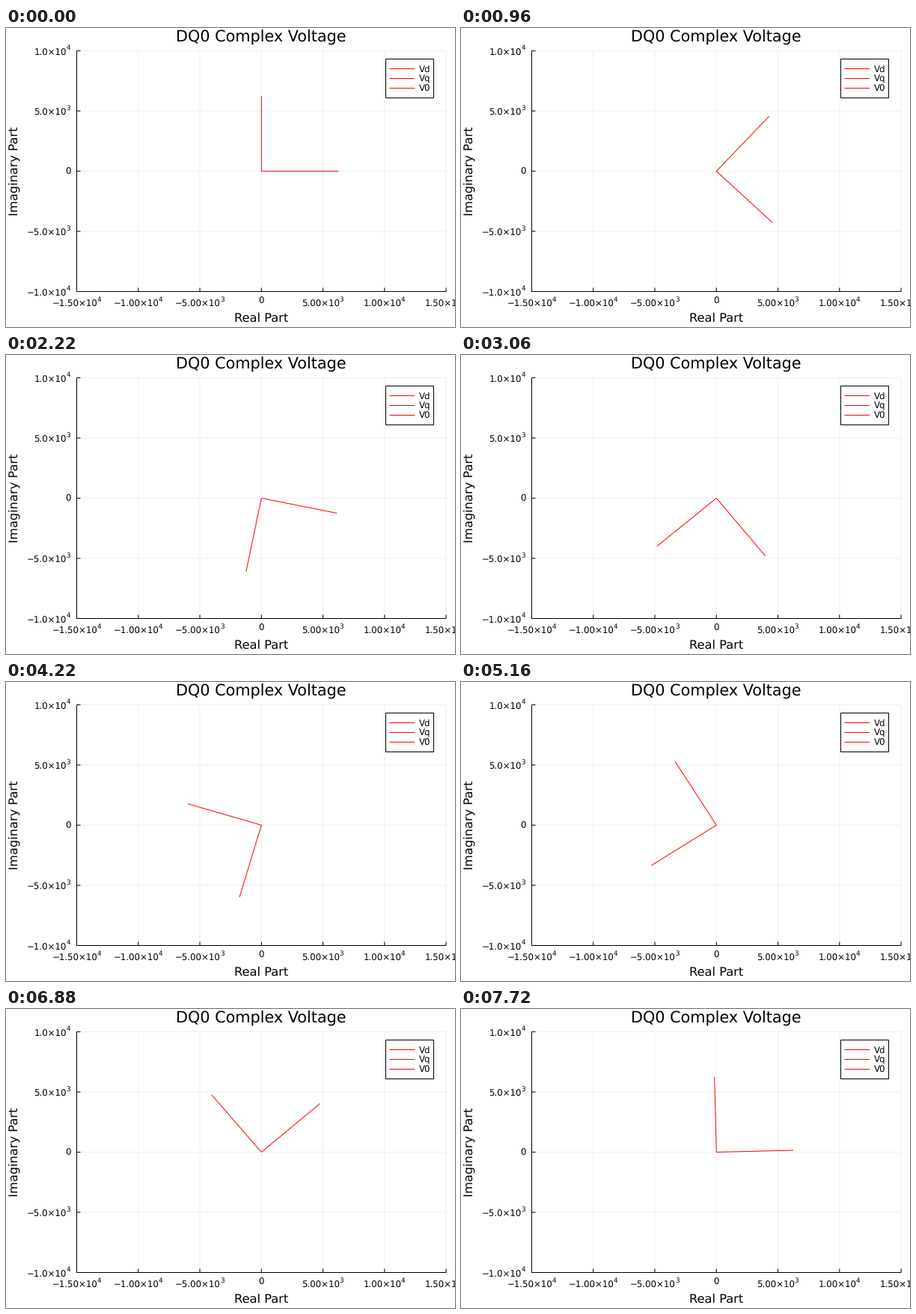
Recreate the animation shown at these times as a matplotlib script. Size 600 px wide and 400 px high, loop 7.74 s.

```python
import numpy as np
import matplotlib.pyplot as plt
from matplotlib.animation import FuncAnimation

W, H, DPI = 600, 400, 100
PT = 72 / DPI                       # points per pixel
LEFT, RIGHT, TOP, BOTTOM = 94.5, 588.1, 30.5, 352.5
CX, CY = (LEFT + RIGHT) / 2, (TOP + BOTTOM) / 2
SX, SY = (RIGHT - LEFT) / 30000, (BOTTOM - TOP) / 20000  # pixels per volt
AMP = 6245
STEP = np.radians(2.16)             # 60 Hz sampled every 0.1 ms
TICK, GUIDE, TITLE = 11.8, 16.2, 20.75
EXPONENT = 0.75 * TICK

plt.rcParams["font.family"] = "DejaVu Sans"
plt.rcParams["text.hinting"] = "none"
fig = plt.figure(figsize=(W / DPI, H / DPI), dpi=DPI, facecolor="white")
ax = fig.add_axes([0, 0, 1, 1])
ax.set(xlim=(0, W), ylim=(H, 0))
ax.axis("off")


def line(xs, ys, color="black", **kw):
    return ax.plot(xs, ys, color=color, lw=PT, snap=False,
                   solid_capstyle="butt", **kw)[0]


def text(x, y, s, size=TICK, ha="center", **kw):
    return ax.text(x, y, s, fontsize=size * PT, ha=ha, va="baseline", **kw)


def tick_label(x, y, base, exp, ha):
    """Number with a raised exponent behind it."""
    if not exp:
        return text(x, y, base, ha=ha)
    half = EXPONENT * 0.636 / 2
    label = text(x - half * (1 if ha == "center" else 2), y, base, ha=ha)
    ax.annotate(exp, xy=(1, 0), xycoords=label,
                xytext=(-0.5 * PT, 0.84 * TICK * PT),
                textcoords="offset points", fontsize=EXPONENT * PT,
                ha="left", va="baseline", annotation_clip=False)


x_ticks = [("−1.50×10", "4"), ("−1.00×10", "4"), ("−5.00×10", "3"), ("0", ""),
           ("5.00×10", "3"), ("1.00×10", "4"), ("1.50×10", "4")]
y_ticks = [("1.0×10", "4"), ("5.0×10", "3"), ("0", ""),
           ("−5.0×10", "3"), ("−1.0×10", "4")]

for x, (base, exp) in zip(np.linspace(LEFT, RIGHT, len(x_ticks)), x_ticks):
    line([x, x], [TOP, BOTTOM], "#efefef", zorder=1)
    line([x, x], [BOTTOM, BOTTOM - 5], zorder=2)
    tick_label(x, 373 if exp else 369, base, exp, "center")
for y, (base, exp) in zip(np.linspace(TOP, BOTTOM, len(y_ticks)), y_ticks):
    line([LEFT, RIGHT], [y, y], "#efefef", zorder=1)
    line([LEFT, LEFT + 5], [y, y], zorder=2)
    tick_label(86.4, y + (6.1 if exp else 4.5), base, exp, "right")
line([LEFT, LEFT, RIGHT], [TOP, BOTTOM, BOTTOM], zorder=2)

text(340.7, 18.5, "DQ0 Complex Voltage", TITLE)
text(341, 393.2, "Real Part", GUIDE)
ax.text(11.3, 191.6, "Imaginary Part", fontsize=GUIDE * PT, rotation=90,
        rotation_mode="default", ha="center", va="center")

ax.add_patch(plt.Rectangle((507.5, 41.5), 64, 52, fc="white", ec="black",
                           lw=PT, snap=False, zorder=4))
for y, name in [(54.5, "Vd"), (67.5, "Vq"), (80.5, "V0")]:
    line([512.5, 546.2], [y, y], "red", zorder=5)
    text(551.6, y + 4.4, name, ha="left", zorder=5)

vd = line([], [], "red", zorder=3)
vq = line([], [], "red", zorder=3)


def sample_at(ms):
    """Samples last 20, 100 and 20 ms in turn."""
    cycle, phase = divmod(ms, 140)
    return 3 * cycle + (phase >= 20) + (phase >= 120)


def update(i):
    angle = -STEP * sample_at(i * 20)
    for arm, a in ((vd, angle), (vq, angle + np.pi / 2)):
        arm.set_data([CX, CX + AMP * SX * np.cos(a)],
                     [CY, CY - AMP * SY * np.sin(a)])
    return vd, vq


anim = FuncAnimation(fig, update, frames=387, interval=20, repeat=True,
                     repeat_delay=0, blit=True)
plt.show()
```
